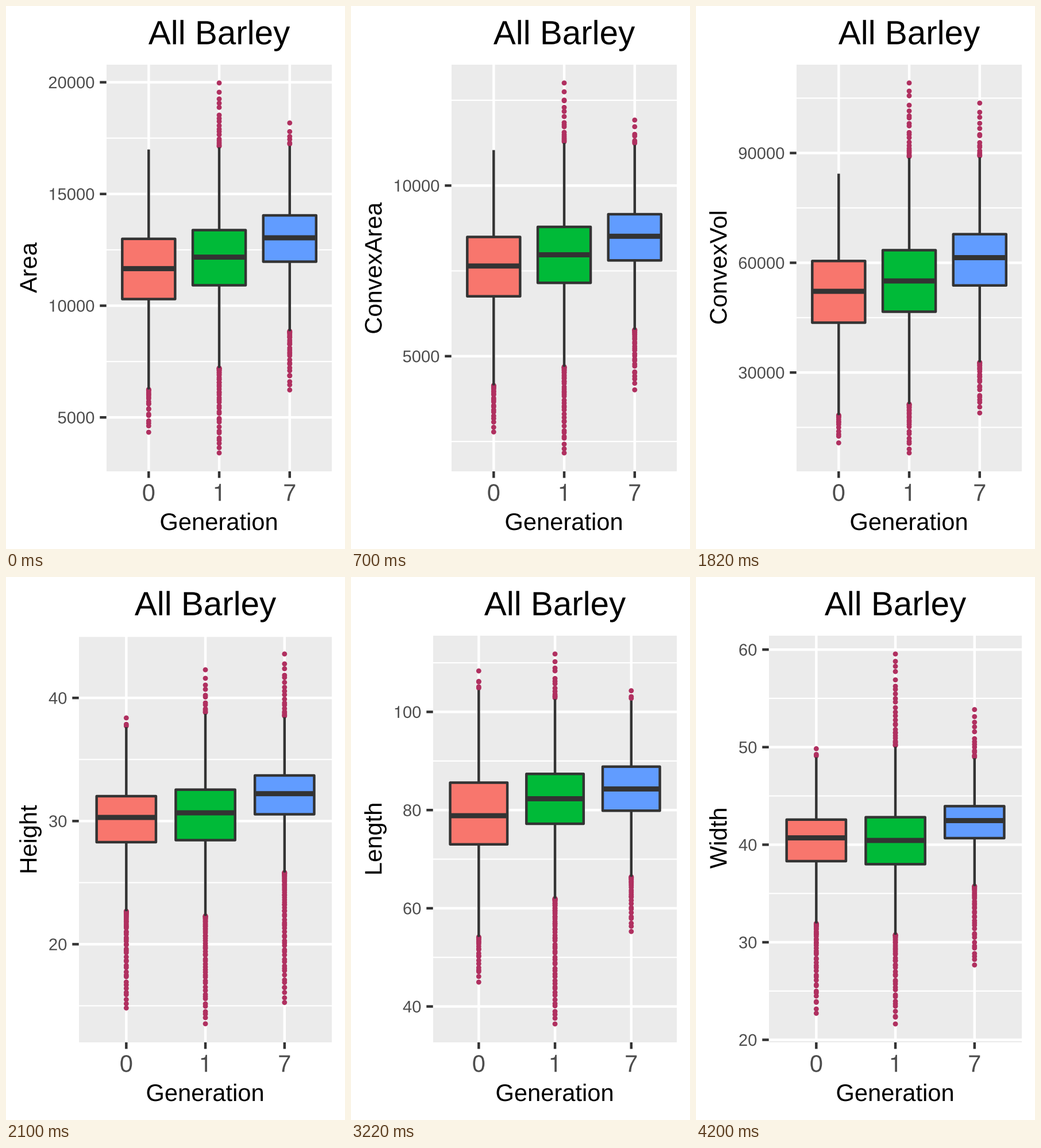
Recreate the animation shown at these times as a matplotlib script. Size 590 by 944 pixels, loop 4.9 s.

```python
import numpy as np
import matplotlib.pyplot as plt
from matplotlib.animation import FuncAnimation
from matplotlib.patches import Circle, PathPatch, Rectangle
from matplotlib.path import Path
from matplotlib.textpath import TextPath

plt.rcParams["font.family"] = "Liberation Sans"

W, H, DPI = 590, 944, 64
PT = 72 / DPI                      # points per pixel
TOP, BOTTOM, RIGHT = 102, 809, 567.4
LINE, TICK, DOT_R = 4.45, 11.4, 4.4
DIGIT = 0.556                      # digit advance in em
BIG, MID, SMALL = 58.33, 41.67, 29.17
DARK, GREY, PANEL, DOT = "#333333", "#4D4D4D", "#EBEBEB", "#B03060"
FILLS = ("#F8766D", "#00BA38", "#619CFF")
GROUPS = ("0", "1", "7")

fig = plt.figure(figsize=(W / DPI, H / DPI), dpi=DPI, facecolor="white")
ax = fig.add_axes([0, 0, 1, 1])
scenes = []


def scene(name, value, drop, y, gap, *boxes):
    """Ticks go down from value at height y, losing drop every gap pixels.

    Each box: highest point, upper quartile, median, lower quartile,
    lowest point, as heights on the stage."""
    scenes.append((name, value, drop, y, gap, boxes))


scene("Area", 20000, 5000, 132.6, 194.2,
      (249.5, 404.8, 456.6, 509.5, 741),
      (133.8, 389.6, 436.6, 485.5, 777),
      (203.3, 364, 403, 444.5, 667.5))
scene("ConvexArea", 10000, 5000, 312.2, 296.6,
      (250.5, 401.5, 452, 504.7, 740.5),
      (133.8, 384, 432.5, 481.3, 777),
      (198.3, 362, 400.3, 442.3, 667.3))
scene("ConvexVol", 90000, 30000, 255.6, 190.8,
      (291.5, 443.3, 496, 550.5, 759.5),
      (133.8, 424.5, 478, 531.5, 777),
      (168.8, 396.7, 437.5, 485.8, 707.5))
scene("Height", 40, 10, 210.2, 214.1,
      (245, 381, 418, 461, 749.3),
      (161.3, 369.7, 410, 457.5, 776.7),
      (133.8, 345, 376.7, 412.5, 739.7))
scene("Length", 100, 20, 234.5, 170.7,
      (163.3, 357.5, 415, 464.8, 704.3),
      (133.8, 342.3, 385.5, 429, 777),
      (197.7, 329.7, 368.5, 406.3, 616.3))
scene("Vol", 100000, 25000, 142.2, 172.75,
      (262.5, 421.8, 475.3, 533, 758.3),
      (204, 401, 457, 513.6, 777),
      (133.8, 374, 415.5, 466, 706))
scene("Width", 60, 10, 126.2, 169.6,
      (298.5, 421.8, 453.5, 494, 758.5),
      (133.8, 417.6, 458, 499.3, 777),
      (230.5, 398.4, 423.5, 454, 674.5))


def footless_one(size):
    flag = [(.259, .505), (.259, 0), (.347, 0), (.347, .709), (.289, .709),
            (.265, .62), (.22, .585), (.102, .568), (.102, .505), (.259, .505)]
    return Path(np.array(flag) * size, closed=True)


def outline(text, size):
    if not text.startswith("1"):
        return TextPath((0, 0), text, size=size)
    one = footless_one(size)
    if text == "1":
        return one
    rest = TextPath((DIGIT * size, 0), text[1:], size=size)
    return Path.make_compound_path(one, rest)


def draw_path(path, x, y, color, turned=False):
    u, v = path.vertices.T
    spots = (x - v, y - u) if turned else (x + u, y - v)
    ax.add_patch(PathPatch(Path(np.column_stack(spots), path.codes),
                           fc=color, lw=0, zorder=5))


def title(text, size, x, y, turned=False):
    """Centre the ink on x, or on y when turned."""
    path = outline(text, size)
    box = path.get_extents()
    mid = (box.x0 + box.x1) / 2
    if turned:
        draw_path(path, x, y + mid, "black", True)
    else:
        draw_path(path, x - mid, y, "black")


def number(text, size, x, y, align):
    """align: share of the width lying left of x."""
    draw_path(outline(text, size), x - align * len(text) * DIGIT * size, y, GREY)


def line(xs, ys, color, width, order):
    ax.plot(xs, ys, color=color, lw=width * PT, zorder=order,
            solid_capstyle="butt", snap=False)


def draw_tail(x, fence, end, gap, rng):
    """Outliers crowd at the fence and thin out towards the end."""
    n = max(3, round(abs(end - fence) / gap))
    t = (np.arange(n) + rng.random(n)) / n
    t[-1] = 1
    for y in fence + (end - fence) * t ** 1.8:
        ax.add_patch(Circle((x, y), DOT_R, fc=DOT, lw=0, zorder=3))


def draw_box(x, half, fill, stats, rng):
    top, q3, median, q1, low = stats
    reach = 1.5 * (q1 - q3)        # whiskers stop at 1.5 box heights
    high_end, low_end = max(q3 - reach, top), min(q1 + reach, low)
    if top < high_end:
        draw_tail(x, high_end - 2, top, 6, rng)
    if low > low_end:
        draw_tail(x, low_end, low, 3.7, rng)
    line((x, x), (high_end, q3), DARK, LINE, 3.5)
    line((x, x), (q1, low_end), DARK, LINE, 3.5)
    ax.add_patch(Rectangle((x - half, q3), 2 * half, q1 - q3, fc=fill, ec=DARK,
                           lw=LINE * PT, joinstyle="round", snap=False, zorder=4))
    line((x - half, x + half), (median, median), DARK, 2 * LINE, 4.5)


def draw_axis(left, value, drop, y, gap):
    for minor in np.arange(y - gap / 2, BOTTOM, gap):
        if minor > TOP:
            line((left, RIGHT), (minor, minor), "white", LINE / 2, 1)
    for k, major in enumerate(np.arange(y, BOTTOM, gap)):
        line((left, RIGHT), (major, major), "white", LINE, 1)
        line((left - TICK, left), (major, major), DARK, LINE, 2)
        number(str(value - k * drop), SMALL, left - 20.3, major + 10.4, 1)


def update(i):
    name, value, drop, y, gap, boxes = scenes[i]
    rng = np.random.default_rng(i)
    ax.clear()
    ax.set_xlim(0, W)
    ax.set_ylim(H, 0)
    ax.axis("off")

    left = 94.7 + 16 * len(str(value))     # room for the widest label
    width = RIGHT - left
    ax.add_patch(Rectangle((left, TOP), width, BOTTOM - TOP, fc=PANEL, lw=0,
                           zorder=0))
    draw_axis(left, value, drop, y, gap)

    pitch = width / 3.2
    for k, stats in enumerate(boxes):
        x = left + (k + 0.6) * pitch
        line((x, x), (TOP, BOTTOM), "white", LINE, 1)
        line((x, x), (BOTTOM, BOTTOM + TICK), DARK, LINE, 2)
        number(GROUPS[k], MID, x, 860.3, 0.5)
        draw_box(x, 0.375 * pitch, FILLS[k], stats, rng)

    middle = (left + RIGHT) / 2
    title("All Barley", BIG, middle, 66.5)
    title("Generation", MID, middle - 0.8, 911)
    title(name, MID, 53.3, 455, turned=True)
    return []


anim = FuncAnimation(fig, update, frames=len(scenes), interval=700,
                     init_func=lambda: [], repeat=True, repeat_delay=0)
plt.show()
```
